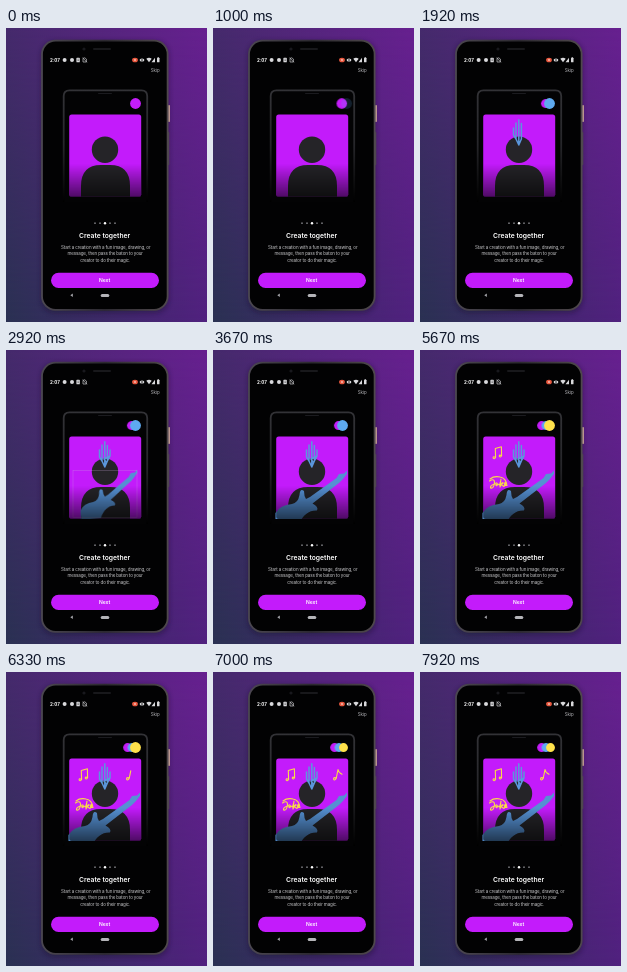
Recreate the animation shown at these times as an HTML page. Size 201 px wide and 294 px high, loop 8 s.

```html
<!DOCTYPE html>
<html lang="en">
<head>
<meta charset="utf-8">
<title>Create together</title>
<style>
  html, body { margin: 0; width: 100%; height: 100%; overflow: hidden; background: #432367; }
  svg { display: block; width: 100%; height: 100%; }
  text { font-family: Inter, Roboto, sans-serif; fill: #fff; }
  .mid { text-anchor: middle; }
  .copy { font-size: 4.5px; letter-spacing: -.03em; fill: #c9c9cc; }
  .dot { transform-box: fill-box; transform-origin: center; }
  .pen { fill: none; stroke-linecap: round; stroke-linejoin: round; stroke-dasharray: 1 2; }
  .blue { stroke: #5b97dc; stroke-width: 1.5; }
  .gold { stroke: #f9dc48; stroke-width: 1.1; }
</style>
</head>
<body>
<svg viewBox="0 0 201 294" preserveAspectRatio="none">
  <defs>
    <linearGradient id="top"><stop stop-color="#452a6c"/><stop offset="1" stop-color="#672090"/></linearGradient>
    <linearGradient id="bottom"><stop stop-color="#2a3152"/><stop offset="1" stop-color="#50217e"/></linearGradient>
    <linearGradient id="down" x2="0" y2="1"><stop stop-color="#000"/><stop offset="1" stop-color="#fff"/></linearGradient>
    <mask id="lower"><rect width="201" height="294" fill="url(#down)"/></mask>
    <linearGradient id="outline" gradientUnits="userSpaceOnUse" x1="0" y1="60" x2="0" y2="174">
      <stop stop-color="#333337"/><stop offset=".5" stop-color="#26262a"/><stop offset="1" stop-color="#000"/>
    </linearGradient>
    <linearGradient id="shade" x2="0" y2="1">
      <stop offset=".6" stop-color="#000" stop-opacity="0"/><stop offset="1" stop-color="#000" stop-opacity=".6"/>
    </linearGradient>
    <linearGradient id="rim"><stop stop-color="#4b4750"/><stop offset=".5" stop-color="#2c2930"/><stop offset="1" stop-color="#4f484c"/></linearGradient>
    <clipPath id="card"><rect x="62" y="86" width="74" height="83"/></clipPath>
    <filter id="blur" x="-20%" y="-20%" width="140%" height="140%"><feGaussianBlur stdDeviation="2.5"/></filter>
  </defs>

  <rect width="201" height="294" fill="url(#top)"/>
  <rect width="201" height="294" fill="url(#bottom)" mask="url(#lower)"/>

  <!-- handset -->
  <rect x="35" y="13" width="128" height="272" rx="14" fill="#150d25" opacity=".4" filter="url(#blur)"/>
  <rect x="162" y="77" width="2" height="17" rx=".8" fill="#b9958f"/>
  <rect x="162" y="104" width="1.3" height="33" rx=".6" fill="#4d4650"/>
  <rect x="36" y="12.6" width="125.6" height="269.2" rx="13.5" fill="#020203" stroke="url(#rim)" stroke-width="1.8"/>
  <circle cx="78" cy="21" r="1.6" fill="#18181d"/>
  <rect x="87" y="20.2" width="18" height="1.6" rx=".8" fill="#202024"/>

  <!-- status bar -->
  <text x="44" y="33.7" font-size="4.5" font-weight="700">2:07</text>
  <g fill="#d9d9dc">
    <circle cx="58.6" cy="32" r="2"/><circle cx="66" cy="32" r="2"/>
    <rect x="70.4" y="29.8" width="3.4" height="4.5" rx=".6"/>
    <path d="M143 34.2L140.3 30.8Q143 28.8 145.7 30.8ZM145.5 34.2H149V29.8Z"/>
    <rect x="151" y="29.7" width="2.5" height="4.6" rx=".5"/><rect x="151.7" y="29.2" width="1.1" height="1"/>
  </g>
  <path d="M71.5 31.2H72.8M71.5 32.5H72.8" stroke="#111" stroke-width=".5"/>
  <path d="M77 34V30.4L78.7 29.8L80.4 31V34ZM76.7 29.7L80.9 34.3" fill="none" stroke="#c4c4c8" stroke-width=".7"/>
  <ellipse cx="129" cy="32" rx="2.9" ry="2.3" fill="#e8583f"/><circle cx="129" cy="32" r=".9" fill="#f6c5bd"/>
  <ellipse cx="136" cy="32" rx="2.4" ry="1.6" fill="#d9d9dc"/><circle cx="136" cy="32" r=".8" fill="#111"/>
  <text x="144.8" y="44.2" font-size="4.4" style="fill:#b5b5ba">Skip</text>

  <!-- illustration -->
  <path d="M57.7 174V68Q57.7 62.3 63.5 62.3H135.5Q141.2 62.3 141.2 68V174" fill="#030304" stroke="url(#outline)" stroke-width="1.8"/>
  <rect x="92" y="65" width="14" height="1.1" rx=".55" fill="#1b1b1f"/>
  <circle id="violetDot" class="dot" cx="129.5" cy="75.5" r="5.4" fill="#c51dfa"/>
  <circle id="blueDot" class="dot" cx="129.5" cy="75.5" r="5.4" fill="#5eaaf0"/>
  <circle id="yellowDot" class="dot" cx="129.5" cy="75.5" r="5.4" fill="#ffe24b"/>

  <rect x="63.2" y="86.4" width="72" height="82.4" rx="2.5" fill="#c31bfb"/>
  <g fill="#252428">
    <circle cx="99" cy="121.7" r="13.2"/>
    <path d="M75 168.8V158Q75 137 95 137H104Q124 137 124 158V168.8Z"/>
  </g>
  <path id="hair" class="pen blue" pathLength="1" d="M93.5 107V100V107L96 111V95V111L98.8 117V91.8V117L101.4 111V95.5V111L104 106V100V106L98 109L100 112"/>
  <g clip-path="url(#card)">
    <path id="guitar" fill="#5590d2" d="M97 147L93 149Q91 146 91 141Q87 138 86.5 145Q85 153 79 154Q67 155 62.5 163V174H86Q92 160 104 160.5Q106 157 99.5 153.5L126 133L130 129L134 124V120.5L131 123.5L126 124L123.5 128Z"/>
  </g>
  <rect id="selection" x="67" y="120.5" width="64" height="47" fill="none" stroke="#c9a5dc" stroke-width=".5" opacity="0"/>
  <rect x="63.2" y="86.4" width="72" height="82.6" rx="2.5" fill="url(#shade)"/>

  <g class="pen gold">
    <path id="name" pathLength="1" d="M69.5 131Q74 128 74.5 132Q74 139 70.5 138Q70 135 75 134Q76.5 131.5 77.5 134Q77 137 75.8 135Q77 133 79.5 135Q81 131 81 129L80 137Q82 132 83 133"/>
    <path id="swash" pathLength="1" d="M83 133L81 134.5L84 136.5Q87 133 85 132.5Q83.5 136 87 135.5M87 135.5Q86 128 80 127Q74 125.8 70 129"/>
    <path id="noteLeft" pathLength="1" d="M75.6 107.5Q73 105.8 73.1 108Q74.2 109.8 75.6 107.5L75.3 98.5L81.4 96.8L81.6 105.8Q79.2 104.2 79.3 106.3Q80.3 108 81.6 105.8"/>
    <path id="noteRight" pathLength="1" d="M123.2 106.5Q121 104.6 120.5 106.8Q121.3 109.2 123.2 106.5L125 97.5Q125.5 100.8 129 102.3"/>
  </g>

  <!-- page text and controls -->
  <g id="pages"></g>
  <text class="mid" x="98.6" y="210.4" font-size="6.75" font-weight="600">Create together</text>
  <g class="mid">
    <text class="copy" x="99.8" y="220.6">Start a creation with a fun image, drawing, or</text>
    <text class="copy" x="99.2" y="227.2">message, then pass the baton to your</text>
    <text class="copy" x="99.2" y="233.7">creator to do their magic.</text>
  </g>
  <rect x="45" y="244.8" width="108" height="15.2" rx="7.6" fill="#c31bfb"/>
  <text class="mid" x="98.6" y="254.3" font-size="5" font-weight="600">Next</text>
  <path d="M66.8 265.5V269.1L64.3 267.3Z" fill="#a8a8ad"/>
  <rect x="94.7" y="265.9" width="8.6" height="3.1" rx="1.5" fill="#b4b4b8"/>
</svg>
<script>
const LOOP = 8000;
const get = id => document.getElementById(id);

// Steps are [time, properties]; the ends are held to fill the loop.
function play(el, steps, easing = 'ease-in-out') {
  const all = [[0, steps[0][1]], ...steps, [LOOP, steps.at(-1)[1]]];
  el.animate(all.map(([time, props]) => ({ offset: time / LOOP, easing, ...props })),
    { duration: LOOP, iterations: Infinity });
}

const fade = opacity => ({ opacity });
const dot = (x, scale = 1, opacity = 1) => ({ transform: `translateX(${x}px) scale(${scale})`, opacity });
const place = (x, y, angle, scale) =>
  `translate(${x}px, ${y}px) rotate(${angle}deg) scale(${scale}) translate(-99px, -144px)`;

function draw(el, start, end) {
  play(el, [
    [start - 1, { strokeDashoffset: 1.01, opacity: 0 }],
    [start, { strokeDashoffset: 1.01, opacity: 1 }],
    [end, { strokeDashoffset: 0, opacity: 1 }]
  ], 'linear');
}

// The newest circle is large; earlier ones shrink and move aside.
const SMALL = .82;
play(get('violetDot'), [[900, dot(0)], [1250, dot(-4.1, SMALL)], [3750, dot(-4.1, SMALL)], [4100, dot(-7.9, SMALL)]]);
play(get('blueDot'), [
  [900, dot(5, 1, 0)], [1250, dot(0)], [3750, dot(0)], [4100, dot(-3.5, SMALL)]
]);
play(get('yellowDot'), [[3750, dot(5, 1, 0)], [4100, dot(0)], [6600, dot(0)], [6900, dot(1, SMALL)]]);

draw(get('hair'), 1330, 2080);

play(get('guitar'), [
  [2420, { transform: place(103.5, 142, -5, .8), opacity: 0 }],
  [2590, { transform: place(103.5, 142, -5, .84), opacity: 1 }],
  [2950, { transform: place(103.5, 142, -5, .84), opacity: 1 }],
  [3500, { transform: place(99, 144, 0, 1), opacity: 1 }]
]);
play(get('selection'), [[2480, fade(0)], [2600, fade(.5)], [3500, fade(.5)], [3600, fade(0)]]);

draw(get('name'), 4200, 4620);
draw(get('swash'), 4620, 5080);
draw(get('noteLeft'), 5200, 5620);
draw(get('noteRight'), 6000, 6500);

for (let i = 0; i < 5; i++) {
  const page = document.createElementNS('http://www.w3.org/2000/svg', 'circle');
  const current = i === 2;
  const values = { cx: 89 + i * 5, cy: 195.2, r: current ? 1.2 : .9, fill: current ? '#fff' : '#77777c' };
  for (const key in values) page.setAttribute(key, values[key]);
  get('pages').append(page);
}
</script>
</body>
</html>
```
